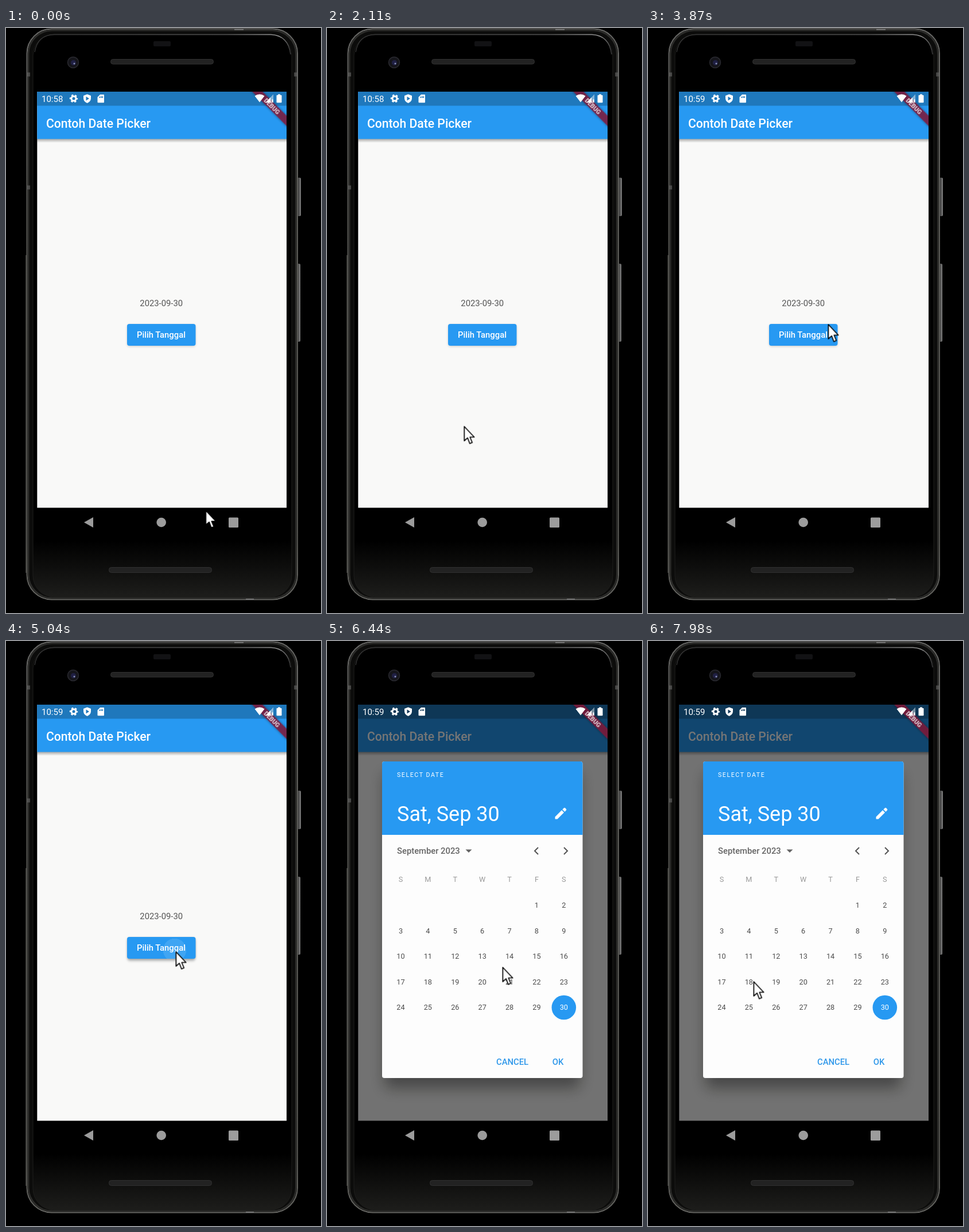
An HTML page that plays this animation: 549 by 1020 pixels, repeating every 8 s.

```html
<!DOCTYPE html>
<html lang="id">
<head>
<meta charset="utf-8">
<title>Contoh Date Picker</title>
<style>
  html, body { margin: 0; width: 100%; height: 100%; overflow: hidden; background: #000; }
  svg { display: block; width: 100vw; height: 100vh; font-family: Roboto, sans-serif; }
  .medium { font-weight: 500; }
  .mid { text-anchor: middle; }
  .anim { animation: 8s linear infinite; }

  #early { animation-name: early; animation-timing-function: step-end; }
  #late { animation-name: late; animation-timing-function: step-end; }
  @keyframes early { 0% { opacity: 1 } 42% { opacity: 0 } 100% { opacity: 0 } }
  @keyframes late { 0% { opacity: 0 } 42% { opacity: 1 } 100% { opacity: 1 } }

  #lift { animation-name: lift; }
  @keyframes lift { 0%, 61.4% { opacity: 0 } 63%, 64.2% { opacity: 1 } 66.5%, 100% { opacity: 0 } }

  #ripple { animation-name: ripple; transform-origin: 294px 539px; }
  @keyframes ripple {
    0%, 61.4% { opacity: 0; transform: scale(.4) }
    62% { opacity: .12 }
    63% { opacity: .12; transform: scale(1) }
    64.2% { opacity: .12; transform: scale(2) }
    66%, 100% { opacity: 0; transform: scale(5) }
  }

  #modal { animation-name: modal; }
  @keyframes modal {
    0%, 64.2% { opacity: 0; animation-timing-function: ease-out }
    66.1%, 100% { opacity: 1 }
  }

  #cursor { animation-name: cursor; animation-timing-function: ease-in-out; }
  @keyframes cursor {
    0% { transform: translate(347.5px, 840px) }
    16.75%, 20% { transform: translate(345.5px, 838px) }
    34%, 36.5% { transform: translate(93.5px, 497.5px) }
    47.5%, 49.5% { transform: translate(313.5px, 515.5px) }
    58%, 67% { transform: translate(295.5px, 540.5px) }
    79%, 83% { transform: translate(305.5px, 567.5px) }
    98%, 100% { transform: translate(183.5px, 592.5px) }
  }
</style>
</head>
<body>
<svg viewBox="0 0 549 1020" preserveAspectRatio="none">
  <defs>
    <linearGradient id="edge" x2="0" y2="1">
      <stop offset="0" stop-color="#6a6a68"/>
      <stop offset=".3" stop-color="#5c5c58"/>
      <stop offset=".9" stop-color="#50504c"/>
      <stop offset="1" stop-color="#6a6a66"/>
    </linearGradient>
    <linearGradient id="rim">
      <stop offset="0" stop-color="#333"/>
      <stop offset=".75" stop-color="#505050"/>
      <stop offset=".95" stop-color="#999"/>
      <stop offset="1" stop-color="#444"/>
    </linearGradient>
    <linearGradient id="key">
      <stop offset="0" stop-color="#222"/>
      <stop offset=".6" stop-color="#555"/>
      <stop offset="1" stop-color="#888"/>
    </linearGradient>
    <linearGradient id="glass" x2="0" y2="1">
      <stop offset=".9" stop-color="#000"/>
      <stop offset="1" stop-color="#1d1d1b"/>
    </linearGradient>
    <linearGradient id="shade" x2="0" y2="1">
      <stop offset="0" stop-color="#000" stop-opacity=".34"/>
      <stop offset="1" stop-color="#000" stop-opacity="0"/>
    </linearGradient>
    <filter id="soft" x="-30%" y="-60%" width="160%" height="220%"><feGaussianBlur stdDeviation="2"/></filter>
    <filter id="softer" x="-20%" y="-20%" width="140%" height="140%"><feGaussianBlur stdDeviation="13"/></filter>
    <clipPath id="screen"><rect x="54.300" y="111" width="434.700" height="725.600"/></clipPath>
    <clipPath id="face"><rect x="211" y="516" width="119.500" height="38" rx="4"/></clipPath>
  </defs>

  <rect width="549" height="1020"/>

  <!-- phone body -->
  <g fill="none">
    <rect x="507" y="261" width="7" height="67" rx="2" fill="url(#key)"/>
    <rect x="506" y="411" width="7" height="136" rx="2" fill="url(#key)"/>
    <rect x="36.500" y="1.500" width="471.500" height="995" rx="43" fill="#0c0c0b" stroke="url(#edge)" stroke-width="2"/>
    <rect x="39" y="4" width="466.500" height="990" rx="41" stroke="#2b2b29" stroke-width="3"/>
    <rect x="47" y="11" width="451" height="981" rx="37" fill="url(#glass)" stroke="#1e1e1c"/>
    <path d="M50 42Q55 12 84 11.500H462Q492 13 496 46" stroke="url(#rim)" stroke-width="1.300"/>
    <path d="M35 396V950" stroke="#50504c" stroke-width="1.500"/>
    <path d="M37 81H42M37 278H42M502 81H508" stroke="#666" stroke-width="7" opacity=".6"/>
    <path d="M398 2.500H414M418 996H432" stroke="#777" stroke-width="2"/>
  </g>
  <rect x="257" y="23" width="30" height="9" rx="2" fill="#121214"/>
  <circle cx="117" cy="60" r="9.500" fill="#15151a" stroke="#2a2a30" stroke-width="1.500"/>
  <circle cx="117.500" cy="60.500" r="4.500" fill="#202044"/>
  <circle cx="119" cy="62" r="1.500" fill="#8a92b8"/>
  <g fill="#222" stroke="#303030">
    <rect x="182.500" y="54.500" width="179" height="8.500" rx="4"/>
    <rect x="179.500" y="940.500" width="179" height="9" rx="4"/>
  </g>

  <g fill="#9c9c9c">
    <path d="M136 862L152 853V871Z"/>
    <circle cx="270.700" cy="862" r="8.300"/>
    <rect x="388" y="853.500" width="17" height="17.500" rx="1.500"/>
  </g>

  <g clip-path="url(#screen)">
    <!-- app -->
    <rect x="54" y="111" width="435" height="726" fill="#f9f9f8"/>
    <rect x="54" y="193" width="435" height="7" fill="url(#shade)"/>
    <rect x="54" y="111" width="435" height="82.500" fill="#2799f2"/>
    <rect x="54" y="111" width="435" height="24.500" fill="#1f78bc"/>
    <text x="70" y="173.500" font-size="21.160" class="medium" fill="#fff">Contoh Date Picker</text>

    <text x="270.700" y="485" font-size="14.800" class="mid" fill="#555">2023-09-30</text>
    <rect x="211.500" y="517.500" width="118.500" height="37.500" rx="4" opacity=".2" filter="url(#soft)"/>
    <rect id="lift" class="anim" x="212" y="520" width="117.500" height="38" rx="4" fill="#000" fill-opacity=".22" filter="url(#soft)"/>
    <rect x="211" y="516" width="119.500" height="38" rx="4" fill="#2799f2"/>
    <g clip-path="url(#face)"><circle id="ripple" class="anim" cx="294" cy="539" r="20" fill="#fff"/></g>
    <text x="270.500" y="540" font-size="14.800" class="mid medium" fill="#fff">Pilih Tanggal</text>

    <!-- date dialog -->
    <g id="modal" class="anim">
      <rect x="54" y="111" width="435" height="726" opacity=".54"/>
      <rect x="100" y="230" width="341" height="550" rx="8" opacity=".38" filter="url(#softer)"/>
      <rect x="96" y="210" width="349.500" height="552" rx="4" fill="#fdfdfd"/>
      <path d="M96 338V214Q96 210 100 210H441.500Q445.500 210 445.500 214V338Z" fill="#2799f2"/>
      <g fill="#fff">
        <text x="122" y="237" font-size="10.580" letter-spacing="1.590">SELECT DATE</text>
        <text x="122" y="313.500" font-size="36">Sat, Sep 30</text>
        <path d="M397.500 306.500V310.500H401.500L413 299L409 295ZM410.300 293.700L413 291Q414 290.300 415 291L417 293.200Q417.600 294 417 295L414.300 297.700Z"/>
      </g>
      <text x="122" y="371" font-size="14.800" class="medium" fill="#646464">September 2023</text>
      <path d="M241.500 363.500H252.500L247 369Z" fill="#646464"/>
      <path d="M368 360L362 366L368 372M413 360L419 366L413 372" fill="none" stroke="#555" stroke-width="2"/>
      <circle cx="412.800" cy="639" r="21.300" fill="#2799f2"/>
      <g id="days" class="mid" font-size="12.700"></g>
      <g font-size="14.800" class="mid medium" fill="#2f98ea">
        <text x="323" y="738.800">CANCEL</text>
        <text x="402.500" y="738.800">OK</text>
      </g>
    </g>

    <!-- corner banner -->
    <g transform="translate(489 111) rotate(45)">
      <rect x="-48" y="29" width="96" height="14" opacity=".3" filter="url(#soft)"/>
      <rect x="-48" y="29.600" width="96" height="12.700" fill="#86183a" fill-opacity=".82"/>
      <text y="39.700" font-size="10.600" font-weight="900" class="mid" fill="#fff" fill-opacity=".75">DEBUG</text>
    </g>

    <!-- status bar -->
    <g fill="#fff">
      <g font-size="15">
        <text id="early" class="anim" x="62" y="129">10:58</text>
        <text id="late" class="anim" x="62" y="129">10:59</text>
      </g>
      <g fill="none" stroke="#fff">
        <circle cx="118" cy="123" r="4" stroke-width="3"/>
        <circle cx="118" cy="123" r="6" stroke-width="2.400" stroke-dasharray="3.140" stroke-dashoffset="1.570"/>
      </g>
      <path fill-rule="evenodd" d="M141.500 115.500L148 118V123Q147.500 128.500 141.500 131Q135.500 128.500 135 123V118ZM139.500 119.500V126.500L145 123Z"/>
      <path fill-rule="evenodd" d="M164 116H170Q171 116 171 117V129Q171 130.300 170 130.300H160.500Q159.500 130.300 159.500 129V120.500ZM162.500 119.500V122H164V119.500ZM165 119V122H166.500V119ZM167.500 119V122H169V119Z"/>
      <path d="M433.500 118.500Q442 112.500 450.500 118.500L442 129.500Z"/>
      <path d="M466 115.500V130H452.500Z" opacity=".45"/>
      <path d="M461 121V130H452.500ZM463.500 124.500H465.500V130H463.500Z"/>
      <path d="M474 115.500H478V117H479.500Q480.500 117 480.500 118V129Q480.500 130.300 479.500 130.300H472.500Q471.500 130.300 471.500 129V118Q471.500 117 472.500 117H474Z"/>
    </g>
  </g>

  <g id="cursor" class="anim">
    <path d="M.8 1.500V26.500L6.600 21.300L10.400 31.300L14.700 29.500L10.800 20H18.200Z" fill="#fff" stroke="#000" stroke-width="1.700" stroke-linejoin="round"/>
  </g>
</svg>
<script>
  const days = document.getElementById('days');

  function cell(label, col, y, fill) {
    const text = document.createElementNS('http://www.w3.org/2000/svg', 'text');
    text.setAttribute('x', 128.5 + col * 47.38);
    text.setAttribute('y', y);
    text.setAttribute('fill', fill);
    text.textContent = label;
    days.append(text);
  }

  [...'SMTWTFS'].forEach((name, col) => cell(name, col, 420.3, '#999'));
  for (let day = 1; day <= 30; day++) {
    const slot = day + 4; // the month begins on a Friday
    cell(day, slot % 7, 465 + Math.floor(slot / 7) * 44.6, day === 30 ? '#fff' : '#4c4c4c');
  }
</script>
</body>
</html>
```
